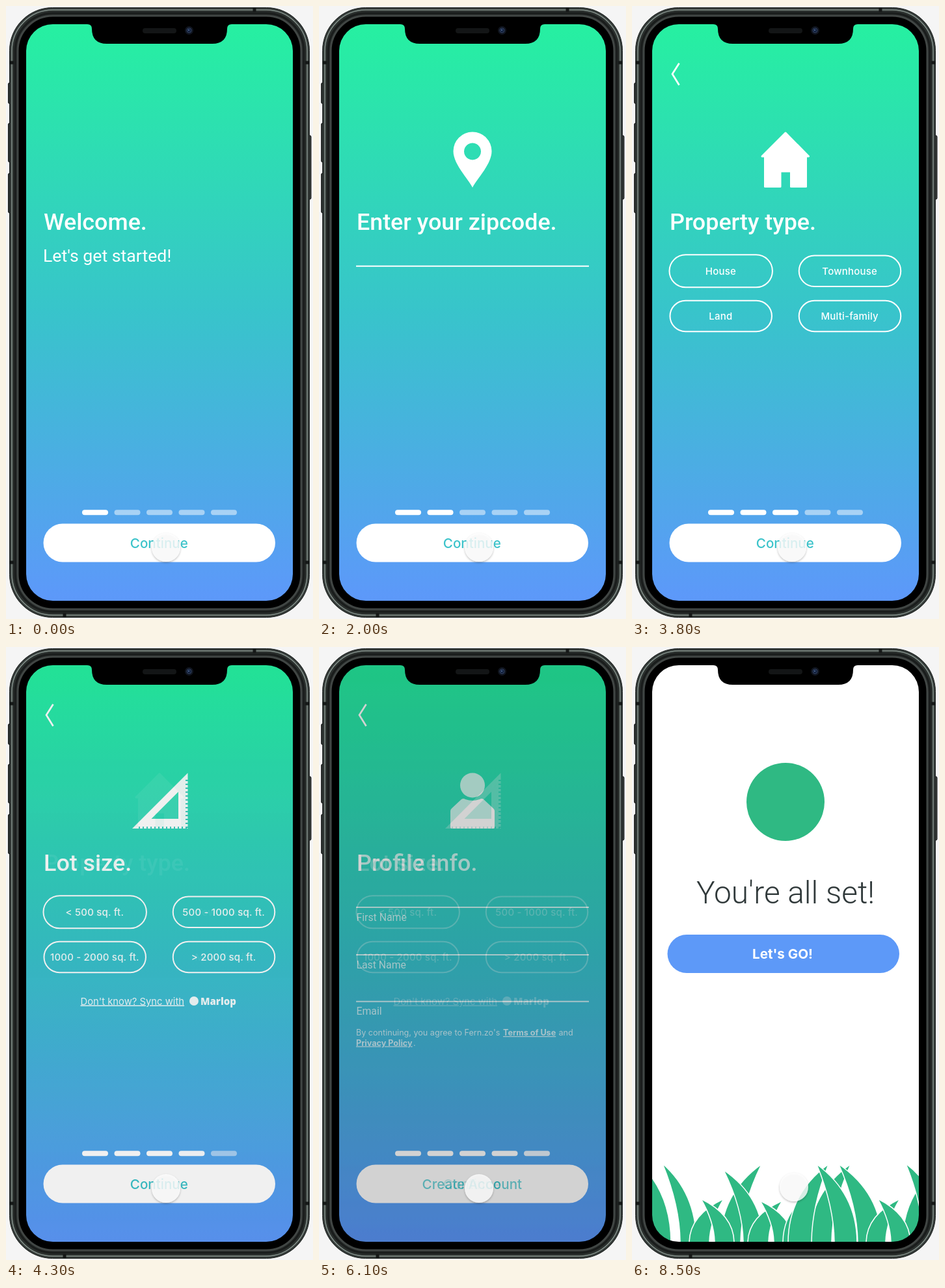
These frames come from a looping animation (472x942 px, 8.6 s). An HTML page:

```html
<!DOCTYPE html>
<html lang="en">
<head>
<meta charset="utf-8">
<title>Onboarding flow</title>
<style>
  html, body { margin: 0; width: 100%; height: 100%; overflow: hidden; background: #f5f5f5; }
  svg { display: block; width: 472px; height: 942px; }
  text { fill: #fff; white-space: pre; }
  .title { font: 500 35.8px Roboto, sans-serif; }
  .sub { font: 400 26.7px Roboto, sans-serif; }
  .label { font: 400 15.8px Roboto, sans-serif; }
  .pill { font: 500 15px Inter, sans-serif; letter-spacing: .2px; text-anchor: middle; }
  .sync { font: 400 14.8px Inter, sans-serif; text-decoration: underline; }
  .brand { font: 800 15px "Open Sans", sans-serif; }
  .legal { font: 400 12.6px Inter, sans-serif; }
  .link { font: 700 12.6px Inter, sans-serif; text-decoration: underline; }
  .action { font: 500 20.6px Inter, sans-serif; text-anchor: middle; fill: #3bc3ca; }
  .done { font: 300 47.8px Roboto, sans-serif; text-anchor: middle; fill: #30393a; }
  .go { font: 700 20.6px Inter, sans-serif; text-anchor: middle; }
</style>
</head>
<body>
<svg viewBox="0 0 472 942" xmlns="http://www.w3.org/2000/svg">
  <defs>
    <linearGradient id="sky" x1="0" y1="0" x2="0" y2="1">
      <stop offset="0" stop-color="#26f0a1"/>
      <stop offset=".5" stop-color="#38c4cb"/>
      <stop offset="1" stop-color="#5d98fa"/>
    </linearGradient>
    <clipPath id="glass"><rect x="31" y="28" width="410" height="886" rx="41"/></clipPath>
    <filter id="shadow" x="-40%" y="-40%" width="180%" height="180%">
      <feDropShadow dx="0" dy="1.5" stdDeviation="1.8" flood-opacity=".33"/>
    </filter>
  </defs>

  <!-- Phone body -->
  <g fill="#3d4341" stroke="#111" stroke-width="1">
    <rect x="3.500" y="118" width="5" height="32" rx="2"/>
    <rect x="3.500" y="180" width="5" height="60" rx="2"/>
    <rect x="3.500" y="257" width="5" height="61" rx="2"/>
    <rect x="463" y="199" width="6" height="98" rx="2"/>
  </g>
  <rect x="5.500" y="2.500" width="461" height="937" rx="66" fill="#343a38" stroke="#1c211f"/>
  <rect x="9" y="6" width="454" height="930" rx="63" fill="#2b302e" stroke="#84918b" stroke-width="1.500"/>
  <rect x="14" y="11" width="444" height="920" rx="58" fill="#232726" stroke="#1a1d1c" stroke-width="3"/>
  <rect x="18" y="15" width="436" height="912" rx="54" fill="#000" stroke="#414644" stroke-width="3"/>
  <path d="M382 3v6M90 933v6M6 87h6M460 87h6M6 855h6M460 855h6" stroke="#151817" stroke-width="5"/>

  <g clip-path="url(#glass)">
    <rect x="31" y="28" width="410" height="886"/>
    <g id="screens"></g>
  </g>

  <!-- Notch -->
  <path d="M125 27H347V28Q340 28 340 35Q340 58 317 58H155Q132 58 132 35Q132 28 125 28Z"/>
  <rect x="210" y="34" width="52" height="8" rx="4" fill="#131516"/>
  <circle cx="281.5" cy="37.5" r="6.5" fill="#10151f"/>
  <circle cx="281.5" cy="37.5" r="3.5" fill="#13213d" stroke="#334261"/>
  <circle cx="281" cy="37" r="1" fill="#5c77a5"/>

  <circle id="touch" r="22" fill="#fff" fill-opacity=".78" filter="url(#shadow)"/>
</svg>

<script>
const LOOP = 8600, STEP = 100, FADE = 600;
const fadeStarts = [560, 2160, 3940, 5865, 7950];
const touchPath = [[0, 246, 832], [6300, 246, 832], [7300, 250, 828], [7700, 250, 828], [8400, 249, 830], [LOOP, 249, 830]];

const text = (cls, x, y, s) => `<text class="${cls}" x="${x}" y="${y}">${s}</text>`;
const title = s => text('title', 58, 344, s);
const rule = y => `<path d="M57 ${y}H415" stroke="#fff" stroke-width="2"/>`;
const field = (y, s) => rule(y) + text('label', 57.5, y + 20.5, s);

const icons = {
  pin: '<path fill="#fff" fill-rule="evenodd" d="M236 279C229 265 206.500 243 206.500 223A29.500 29.500 0 0 1 265.500 223C265.500 243 243 265 236 279ZM236 210.500a13 13 0 1 0 .01 0Z"/>',
  house: '<path fill="#fff" stroke="#fff" stroke-width="3" stroke-linejoin="round" d="M236 195L271.500 231H267.500V277.500H244.500V254H228V277.500H204.500V231H200Z"/>',
  ruler: '<path fill="#fff" fill-rule="evenodd" d="M194 279L279.500 193.500V279ZM223.500 264H265V222.500Z"/>' +
    '<path stroke="#35cabb" stroke-width="4" stroke-dasharray="2 4" d="M204 278H278M278 204V278"/>',
  person: '<circle cx="236" cy="212.500" r="19" fill="#fff"/>' +
    '<path fill="#fff" d="M202 277V252Q202 250 204 248L219 234Q222 232 225 234Q236 238 247 234Q250 232 253 234L268 248Q270 250 270 252V277Q270 279 268 279H204Q202 279 202 277Z"/>'
};

function pills(labels) {
  return labels.map((s, i) => {
    const cx = i % 2 ? 335 : 136.7, cy = i < 2 ? 407.3 : 476.5;
    const w = i ? 156.5 : 158.5, h = i ? 47.5 : 50;
    return `<rect x="${cx - w / 2}" y="${cy - h / 2}" width="${w}" height="${h}" rx="${h / 2}" fill="none" stroke="#fff" stroke-width="2"/>` +
      text('pill', cx - .3, cy + 5.7, s);
  }).join('');
}

function page(step, content, action = 'Continue') {
  let bars = '';
  for (let i = 0; i < 5; i++)
    bars += `<rect x="${117 + i * 49.5}" y="774.300" width="40" height="8" rx="4" fill="#fff" opacity="${i < step ? 1 : .5}"/>`;
  const back = step > 2 ? '<path d="M72.500 88L62 104.500L72.500 121.500" fill="none" stroke="#fff" stroke-width="2.700"/>' : '';
  return '<rect x="31" y="28" width="410" height="886" fill="url(#sky)"/>' + back + content + bars +
    '<rect x="57.500" y="795.500" width="356.500" height="59" rx="29.500" fill="#fff"/>' + text('action', 235.3, 833, action);
}

// Each blade: base left, base right, tip x, tip y
const blades = [
  [25, 60, 8, 790], [74, 99, 47, 794],
  [136, 167, 199, 795], [171, 202, 141, 804],
  [88, 119, 141, 848], [127, 157, 106, 848],
  [178, 210, 231, 851], [218, 248, 197, 851], [232, 250, 264, 848],
  [272, 307, 336, 795], [347, 384, 318, 795],
  [240, 276, 302, 795], [311, 346, 284, 795],
  [416, 446, 470, 800], [448, 480, 421, 794],
  [360, 390, 412, 848], [398, 428, 378, 848]
];
function blade([a, b, x, y]) {
  const h = 914 - y, leansRight = x > a;
  const outer = y + h * .38, inner = y + h * .55;
  const [bendA, bendB] = leansRight ? [outer, inner] : [inner, outer];
  return `<path d="M${a} 916Q${a} ${bendA} ${x} ${y}Q${b} ${bendB} ${b} 916Z" fill="#2fb983" stroke="#fff" stroke-width="1.500"/>`;
}

const pages = [
  page(1, title('Welcome.') + text('sub', 57, 393, "Let's get started!")),
  page(2, icons.pin + title('Enter your zipcode.') + rule(399.7)),
  page(3, icons.house + title('Property type.') + pills(['House', 'Townhouse', 'Land', 'Multi-family'])),
  page(4, icons.ruler + title('Lot size.') +
    pills(['&lt; 500 sq. ft.', '500 - 1000 sq. ft.', '1000 - 2000 sq. ft.', '&gt; 2000 sq. ft.']) +
    text('sync', 114.5, 549.5, "Don't know? Sync with") +
    '<circle cx="289" cy="544" r="7" fill="#fff"/>' + text('brand', 299, 550, 'Marlop')),
  page(5, icons.person + title('Profile info.') +
    field(400, 'First Name') + field(473, 'Last Name') + field(544.7, 'Email') +
    text('legal', 57, 597, "By continuing, you agree to Fern.zo's") +
    text('link', 283, 597, 'Terms of Use') + text('legal', 368.5, 597, 'and') +
    text('link', 57, 612.5, 'Privacy Policy') + text('legal', 145, 612.5, '.'), 'Create Account'),
  '<rect x="31" y="28" width="410" height="886" fill="#fff"/><circle cx="236" cy="238" r="60" fill="#2fb983"/>' +
    text('done', 236, 394, "You're all set!") +
    '<rect x="54.500" y="442" width="356.500" height="59" rx="29.500" fill="#5d99f8"/>' + text('go', 231.5, 479, "Let's GO!") +
    blades.map(blade).join('')
];

// Later pages sit underneath, so the outgoing page fades out on top.
const holder = document.getElementById('screens');
holder.innerHTML = pages.map(p => `<g>${p}</g>`).reverse().join('');
const layers = [...holder.children].reverse();
const touch = document.getElementById('touch');

const clamp = v => Math.min(1, Math.max(0, v));
const easeOut = u => 1 - (1 - u) ** 3;
const shown = (i, t) => i < 0 ? 1 : i >= fadeStarts.length ? 0 : easeOut(clamp((t - fadeStarts[i]) / FADE));

function draw(t) {
  layers.forEach((layer, i) => {
    const alpha = shown(i - 1, t) * (1 - shown(i, t));
    layer.setAttribute('opacity', alpha);
    layer.setAttribute('display', alpha > 0 ? 'inline' : 'none');
  });
  const k = touchPath.findIndex(p => p[0] > t);
  const [t0, x0, y0] = touchPath[k - 1], [t1, x1, y1] = touchPath[k];
  const u = (t - t0) / (t1 - t0);
  touch.setAttribute('cx', x0 + (x1 - x0) * u);
  touch.setAttribute('cy', y0 + (y1 - y0) * u);
}

const start = performance.now();
function tick() {
  const t = (performance.now() - start) % LOOP;
  draw(Math.floor(t / STEP) * STEP);
  requestAnimationFrame(tick);
}
tick();
</script>
</body>
</html>
```
